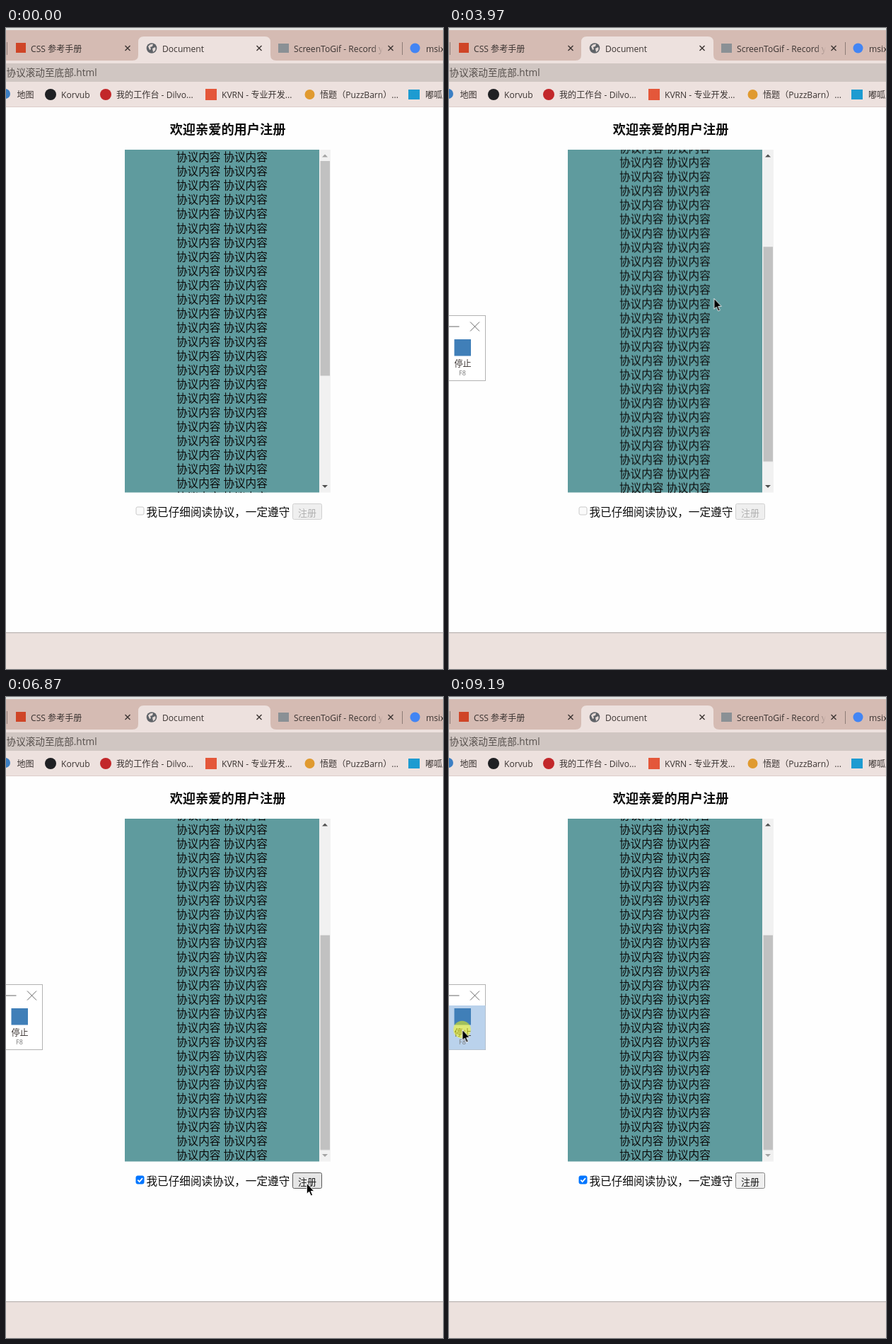
An HTML page for the animation above (9.23 s loop, 618 px wide and 906 px high).

```html
<!DOCTYPE html>
<html lang="zh-CN">
<head>
<meta charset="utf-8">
<title>Document</title>
<style>
html, body { margin: 0; width: 100%; height: 100%; overflow: hidden; background: #fefefe; }
svg { display: block; width: 618px; height: 906px; }
text { white-space: pre; }
.ui { font: 12.1px "Open Sans", "Noto Sans CJK SC", sans-serif; fill: #3a3331; }
.page { font: 15.6px "Noto Sans CJK SC", "Open Sans", sans-serif; fill: #0c0c0c; }
.mid { text-anchor: middle; }
.line { fill: none; stroke: #3a3331; stroke-width: 1.4; }

.a { animation: 9.23s linear infinite both; }
.step { animation-timing-function: step-end; }
#rows { animation-name: rows; }
#thumb { animation-name: thumb; }
#up { animation-name: up; }
#down { animation-name: down; }
#box { animation-name: box; }
#tick { animation-name: tick; }
#btn { animation-name: btn; }
#btnText { animation-name: btnText; }
#dialog { animation-name: dialog; }
#panel { animation-name: panel; }
#hot { animation-name: hot; }
#pointer { animation-name: move; animation-timing-function: ease-in-out; }
#ring { animation-name: ring; }
#arrow { animation-name: arrow; }
#beam { animation-name: beam; }

@keyframes rows {
  0%, 41.062% { transform: translateY(0); }
  43.012% { transform: translateY(-193px); animation-timing-function: ease-out; }
  44.962%, 100% { transform: translateY(-236px); }
}
@keyframes thumb {
  0%, 41.062% { transform: translateY(0); }
  43.012% { transform: translateY(121px); animation-timing-function: ease-out; }
  44.962%, 100% { transform: translateY(148.7px); }
}
@keyframes up { 0% { fill: #a3a3a3; } 41.062%, 100% { fill: #505050; } }
@keyframes down { 0% { fill: #505050; } 44.962%, 100% { fill: #a3a3a3; } }
@keyframes box {
  0% { stroke: #cacaca; fill: #fafafa; }
  44.962% { stroke: #767676; fill: #fff; }
  63.8% { stroke: #4f4f4f; fill: #fff; }
  67.822% { stroke: #005cc8; fill: #005cc8; }
  70.53%, 100% { stroke: #0075ff; fill: #0075ff; }
}
@keyframes tick { 0% { opacity: 0; } 67.822%, 100% { opacity: 1; } }
@keyframes btn {
  0% { stroke: #d0d0d0; fill: #efefef; }
  44.962%, 78.548%, 100% { stroke: #858585; fill: #efefef; }
  73.46% { stroke: #5a5a5a; fill: #e5e5e5; }
}
@keyframes btnText { 0% { fill: #b0b0b0; } 44.962%, 100% { fill: #1a1a1a; } }
@keyframes dialog { 0%, 88.516%, 100% { opacity: 0; } 78.548% { opacity: 1; } }
@keyframes panel { 0% { opacity: 0; } 2.817%, 100% { opacity: 1; } }
@keyframes hot { 0%, 4.6% { opacity: 0; } 2.817%, 95%, 100% { opacity: 1; } }
@keyframes move {
  0%, 3.2% { transform: translate(20px, 470px); }
  9.101%, 11.593% { transform: translate(189px, 685px); }
  11.918%, 16.902% { transform: translate(189px, 681px); }
  19.827% { transform: translate(384px, 674px); animation-timing-function: ease-out; }
  21.56% { transform: translate(420px, 688px); }
  24.269%, 32.178% { transform: translate(425px, 688px); animation-timing-function: ease-in; }
  34.128% { transform: translate(405px, 474px); animation-timing-function: ease-out; }
  36.84% { transform: translate(379px, 378px); }
  39.22%, 45.5% { transform: translate(374.5px, 382px); }
  51.354% { transform: translate(354px, 409px); }
  58.18%, 63.164% { transform: translate(190.5px, 675.5px); }
  64.897%, 69.989% { transform: translate(192.5px, 679px); }
  74.431%, 80.173% { transform: translate(425px, 687px); }
  83.099% { transform: translate(435px, 291.5px); animation-timing-function: ease-out; }
  86.457%, 89.4% { transform: translate(482px, 171px); }
  96.1%, 100% { transform: translate(18.5px, 470px); }
}
@keyframes ring {
  0%, 14.41%, 27.736%, 61.43%, 67.822%, 78.548%, 88.516% { opacity: 0; }
  13.543%, 25.894%, 60.672%, 67.064%, 77.248%, 87.432%, 97.508%, 100% { opacity: 1; }
}
@keyframes arrow {
  0%, 17.3%, 47.13%, 70.53%, 91.87% { opacity: 0; }
  2.817%, 21.1%, 55.47%, 73.46%, 93.07%, 100% { opacity: 1; }
}
@keyframes beam {
  0%, 21.1%, 55.47%, 73.46%, 93.07%, 100% { opacity: 0; }
  17.3%, 47.13%, 70.53%, 91.87% { opacity: 1; }
}
</style>
</head>
<body>
<svg viewBox="0 0 618 906">
  <defs>
    <linearGradient id="fade"><stop offset="0" stop-color="#d5bbb3" stop-opacity="0"/><stop offset="1" stop-color="#d5bbb3"/></linearGradient>
    <clipPath id="view"><rect x="168" y="172" width="275" height="484.5"/></clipPath>
    <filter id="shade" x="-10%" y="-10%" width="120%" height="130%"><feDropShadow dx="0" dy="1" stdDeviation="1.6" flood-opacity=".4"/></filter>
    <path id="x" d="M-3.5-3.5l7 7m0-7l-7 7"/>
    <path id="bar" d="M-4.5-7.5H-1L0-6.5 1-7.5H4.500M0-6.500V6.500M-4.500 7.500H-1L0 6.500 1 7.500H4.500"/>
  </defs>

  <!-- browser chrome -->
  <rect width="618" height="112" fill="#ede1de"/>
  <rect width="618" height="46" fill="#d5bbb3"/>
  <rect width="618" height="3" fill="#e4e4e2"/>
  <path d="M179 46q8 0 8-8V20q0-8 8-8H366q8 0 8 8V38q0 8 8 8z" fill="#ede1de"/>
  <rect y="50" width="618" height="26" fill="#d0c6c2"/>
  <rect y="111" width="618" height="1" fill="#dccdc9"/>
  <path d="M1.5 20V38M560.5 20V38" stroke="#8d7b76"/>

  <rect x="14" y="21" width="14" height="14" fill="#cf4527"/>
  <circle cx="206" cy="28.5" r="7.3" fill="#5f6368"/>
  <path d="M201 26q3-4 7-3l-1 3-3 1 1 3-2 1zM207 29l4-2q2 4-3 7z" fill="#e5dad7"/>
  <rect x="385" y="22" width="15" height="13" fill="#8a9095"/>
  <circle cx="578.5" cy="28.5" r="7" fill="#4285f4"/>
  <g class="ui">
    <text x="35" y="33.5">CSS 参考手册</text>
    <text x="221" y="33.5">Document</text>
    <text x="407" y="33.5">ScreenToGif - Record y</text>
    <rect x="518" y="20" width="15" height="20" fill="url(#fade)"/>
    <rect x="533" y="20" width="6" height="20" fill="#d5bbb3"/>
    <text x="594" y="33.5">msix</text>
    <text x="-13" y="68" style="font-size:13.6px;fill:#57504d">读协议滚动至底部.html</text>
    <text x="15.5" y="99">地图</text>
    <text x="78" y="99">Korvub</text>
    <text x="156" y="99">我的工作台 - Dilvo...</text>
    <text x="305" y="99">KVRN - 专业开发...</text>
    <text x="444" y="99">悟题（PuzzBarn）...</text>
    <text x="593" y="99">嘟呱嘟呱</text>
  </g>
  <g class="line">
    <use href="#x" x="172" y="28.5"/><use href="#x" x="358" y="28.5"/><use href="#x" x="544" y="28.5"/>
  </g>
  <circle cx="-1" cy="93" r="7" fill="#3c7fc4"/>
  <circle cx="63" cy="94" r="8" fill="#1f2023"/>
  <circle cx="141" cy="94" r="8" fill="#c2272a"/>
  <rect x="282" y="86" width="16" height="16" fill="#e4573a"/>
  <circle cx="429.5" cy="94" r="7" fill="#e09a2f"/>
  <rect x="569" y="87" width="16" height="14" fill="#1d9bd1"/>

  <!-- page -->
  <rect y="112" width="618" height="742" fill="#fefefe"/>
  <rect y="854" width="618" height="52" fill="#ece1dd"/>
  <rect y="854" width="618" height="1.3" fill="#bdb7b5"/>
  <text class="page mid" x="313.5" y="150" style="font-size:18.2px;font-weight:700">欢迎亲爱的用户注册</text>
  <rect x="168" y="172" width="275" height="484.5" fill="#5f9b9e"/>
  <g clip-path="url(#view)"><g id="rows" class="a page mid" style="word-spacing:.6px"></g></g>
  <rect x="443" y="172" width="16" height="484.5" fill="#f1f1f1"/>
  <rect id="thumb" class="a" x="444.5" y="188" width="13.5" height="303.5" fill="#c1c1c1"/>
  <path id="up" class="a step" d="M447 182.5l4-4 4 4z"/>
  <path id="down" class="a step" d="M447 646l4 4 4-4z"/>

  <rect id="box" class="a step" x="184" y="677" width="11" height="11" rx="2"/>
  <path id="tick" class="a step" d="M186.3 682.7l2.4 2.4 4.3-5" fill="none" stroke="#fff" stroke-width="1.8"/>
  <text class="page" x="198.5" y="690">我已仔细阅读协议，一定遵守</text>
  <rect id="btn" class="a step" x="405.5" y="672.5" width="41" height="22" rx="2"/>
  <text id="btnText" class="a step page mid" x="426" y="689.5" style="font-size:13px">注册</text>

  <!-- alert -->
  <g id="dialog" class="a step">
    <rect x="95" y="78" width="435" height="124.5" rx="4" fill="#fff" filter="url(#shade)"/>
    <text class="ui" x="111" y="109" style="font-size:14.8px;fill:#202124">127.0.0.1:5500 显示</text>
    <text class="ui" x="111" y="136" style="font-size:12.7px;fill:#3c4043">触发按钮</text>
    <rect x="452" y="156" width="62" height="30" rx="4" fill="#fff" stroke="#1a66cc" stroke-width="2"/>
    <rect x="454" y="158" width="58" height="26" rx="2.5" fill="#1a73e8"/>
    <text class="ui mid" x="483" y="176" style="fill:#fff">确定</text>
  </g>

  <!-- recorder panel -->
  <g id="panel" class="a step">
    <rect x="-2" y="406.5" width="53.5" height="92" fill="#fff" stroke="#b2b2b2"/>
    <rect id="hot" class="a step" x="-2" y="436" width="53.5" height="62.5" fill="#bad2ec"/>
    <path class="line" d="M0 422H14.5M30 415.5l13 13m0-13l-13 13" style="stroke:#555;stroke-width:.9"/>
    <rect x="7.5" y="440" width="23.5" height="23.5" fill="#407fb8"/>
    <text class="ui mid" x="19.5" y="479">停止</text>
    <text class="ui mid" x="19" y="491" style="font-size:9px;fill:#777">F8</text>
  </g>

  <g id="pointer" class="a">
    <circle id="ring" class="a step" r="12.3" fill="#ff0" fill-opacity=".5"/>
    <path id="arrow" class="a step" d="M.3.3V15.3L3.7 12.2 6.2 18 8.6 17 6.2 11.4H10.7z" fill="#000" stroke="#fff" stroke-width=".9"/>
    <g id="beam" class="a step" fill="none">
      <use href="#bar" stroke="#fff" stroke-width="2.6" stroke-opacity=".7"/>
      <use href="#bar" stroke="#222" stroke-width="1.3"/>
    </g>
  </g>
</svg>
<script>
const rows = document.getElementById('rows');
for (let i = 0; i < 36; i++) {
  const row = document.createElementNS('http://www.w3.org/2000/svg', 'text');
  row.setAttribute('x', 305.4);
  row.setAttribute('y', Math.round(188.4 + i * 20.02));
  row.textContent = '协议内容 协议内容';
  rows.append(row);
}
</script>
</body>
</html>
```
